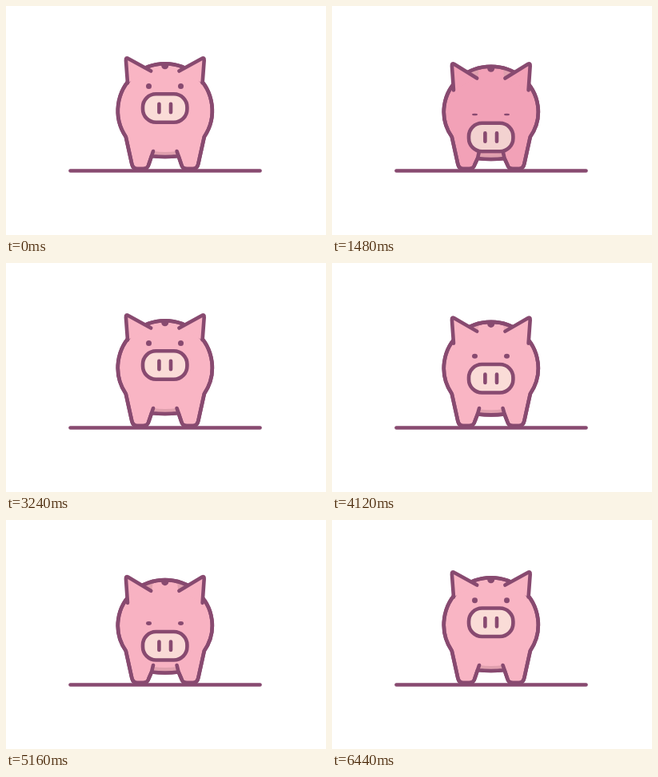
Recreate the animation shown at these times as an HTML page. Size 400 px wide and 287 px high, loop 6480 ms.

```html
<!DOCTYPE html>
<html lang="en">
<head>
<meta charset="utf-8">
<title>Piggy bank</title>
<style>
  html, body { margin: 0; width: 100%; height: 100%; overflow: hidden; background: #fff; }
  svg { display: block; width: 100%; height: 100%; }
</style>
</head>
<body>
<svg viewBox="0 0 400 287" fill="none" stroke="#884a70" stroke-width="4.6" stroke-linecap="round" stroke-linejoin="round">
  <clipPath id="above"><rect id="mouth" x="180" y="-40" width="40"/></clipPath>
  <path id="body" class="skin"/>
  <path id="belly" stroke="none" fill="#e0a0ae"/>
  <path id="shade" stroke="none" fill="#e0a0ae"/>
  <path id="outline"/>
  <path id="slot" stroke="none" fill="#884a70"/>
  <g clip-path="url(#above)">
    <rect id="coin" x="195.7" width="6" height="30" rx="1.5" fill="#f8dc58" stroke-width="3.2"/>
  </g>
  <path id="ears" class="skin"/>
  <g id="eyes" stroke="none" fill="#884a70">
    <ellipse cx="178.5" rx="3.5"/><ellipse cx="218.5" rx="3.5"/>
  </g>
  <g id="snout">
    <rect id="nose" x="171" y="-17.7" width="55.4" height="35.4" rx="16.5"/>
    <path d="M191.4-5.2V5.2M206-5.2V5.2"/>
  </g>
  <path d="M80.5 206.5H317.5"/>
</svg>
<script>
const $ = id => document.getElementById(id);
const set = (el, attrs) => { for (const k in attrs) el.setAttribute(k, attrs[k]); };
const LOOP = 3240, DROPS = [1400, 1900, 2400], FALL = 400;
const CX = 198.8;
const SIDES = [-1, 1];
const clamp = v => Math.max(0, Math.min(1, v));
const ease = (t, a, b) => (1 - Math.cos(Math.PI * clamp((t - a) / (b - a)))) / 2;
const mix = (a, b, k) => a.map((v, i) => v + (b[i] - v) * k);
const rgb = c => `rgb(${c.map(Math.round)})`;

// Quick dip after each coin, then a slower recovery
const bump = t => DROPS.reduce((sum, d) => sum + ease(t, d, d + 80) * (1 - ease(t, d + 80, d + 420)), 0);

function coinTop(t) {
  const next = DROPS.find(d => t < d + 80 && t > d - FALL);
  if (!next) return -60;
  const p = (t - next + FALL) / FALL;
  return -35 + 102.6 * p * p;
}

function bodyPath(top, low) {
  const ry = (164 - top) / 1.557;
  return `M182 ${low}L178.3 199Q177 204 171.5 204H164Q158.5 204 157.3 198L149.8 164` +
    `A59 ${ry} 0 1 1 247.8 164` +
    `L240.3 198Q239 204 233.6 204H226Q220.5 204 219.3 199L215.6 ${low}Q${CX} ${low + 2} 182 ${low}Z`;
}

function earPath(side, n) {
  const x = d => CX + side * d, tip = 65 + 7 * n;
  return `M${x(46.8)} ${96.5 + 9 * n}L${x(48.9)} ${tip + 3}` +
    `Q${x(49.2)} ${tip - 1} ${x(45.8)} ${tip + 1}L${x(17.6)} ${81.5 + 9 * n}`;
}

function shadePath(side, n, top) {
  const x = d => CX + side * d;
  return `M${x(32)} ${83 + 3 * n}L${x(24)} ${top + 5}L${x(15)} ${top + 1}L${x(16.5)} ${81.5 + 9 * n}Z`;
}

function draw(t) {
  const b = bump(t);
  const n = .78 * ease(t, 480, 1200) * (1 - ease(t, 2560, LOOP)) + .22 * b;
  const top = 72.3 + 3.5 * n, low = 188 + 3 * n, edge = 182 + 2.5 * n;
  const shape = bodyPath(top, low);

  set($("body"), { d: shape });
  set($("belly"), { d: `M184 ${edge}Q${CX} ${edge + 2} 213.6 ${edge}L215.6 ${low}Q${CX} ${low + 2} 182 ${low}Z` });
  set($("outline"), { d: shape + `M182 ${low}L184 182M215.6 ${low}L213.6 182` });
  set($("shade"), { d: SIDES.map(s => shadePath(s, n, top)).join(""), opacity: clamp(n * 1.25) });
  set($("slot"), { d: `M194.2 ${top}H203.2V${top + 2.5}A4.5 4.5 0 0 1 194.2 ${top + 2.5}Z` });
  set($("mouth"), { height: top + 42 });
  set($("coin"), { y: coinTop(t) });
  set($("ears"), { d: SIDES.map(s => earPath(s, n)).join("") });
  for (const eye of $("eyes").children) set(eye, { cy: 100.5 + 35.5 * n, ry: 3.5 - n - 1.2 * b });
  set($("snout"), { transform: `translate(0 ${128 + 36.5 * n})` });
  set($("nose"), { fill: rgb(mix([250, 220, 215], [243, 210, 208], b)) });
  const skin = rgb(mix([249, 181, 196], [242, 161, 183], b));
  for (const el of document.querySelectorAll(".skin")) set(el, { fill: skin });
}

function frame() {
  draw(performance.now() % LOOP);
  requestAnimationFrame(frame);
}
frame();
</script>
</body>
</html>
```
